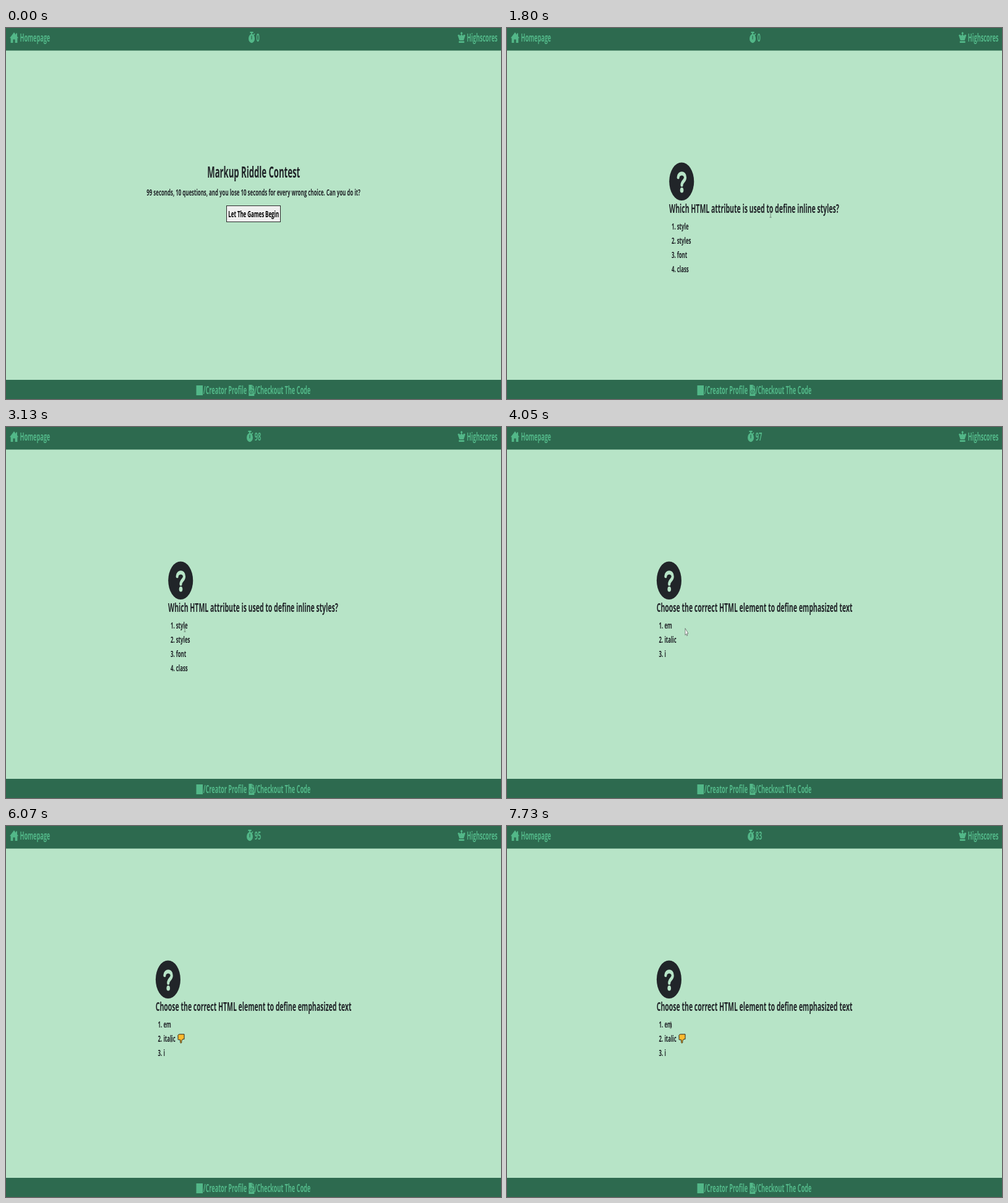
These frames come from a looping animation (800 by 600 pixels, 8 s). An HTML page with a canvas:

```html
<!DOCTYPE html>
<html lang="en">
<head>
<meta charset="utf-8">
<title>Quiz</title>
<style>
  html, body { margin: 0; width: 100%; height: 100%; overflow: hidden; background: #b7e4c7; }
  canvas { display: block; }
</style>
</head>
<body>
<canvas id="stage" width="800" height="600"></canvas>
<script>
const ctx = document.getElementById('stage').getContext('2d');
const LOOP = 8000;
const SQUEEZE = 0.525; // all lettering is equally condensed
const PALE = '#b7e4c7', DARK = '#2d6a4f', MINT = '#52b788', INK = '#212529';

const QUESTIONS = [
  { x: 262, title: 'Which HTML attribute is used to define inline styles?',
    answers: ['style', 'styles', 'font', 'class'] },
  { x: 241.7, title: 'Choose the correct HTML element to define emphasized text',
    answers: ['em', 'italic', 'i'] }
];

// [time, value]: the latest entry reached applies
const SCREEN = [[0, -1], [1730, 0], [4050, 1]];
const COUNTER = [[0, 0], [2730, 98], [3730, 97], [4720, 96], [5720, 95], [6740, 84], [7730, 83]];
const POINTER = [[0, 'none'], [120, 'arrow'], [1000, 'hand'], [1760, 'beam'],
                 [4050, 'arrow'], [5780, 'beam']];

// Pointer path: [time, x, y]
const PATH = [
  [120, 691, 556], [380, 570, 500], [540, 510, 462], [720, 458, 378], [840, 437, 330], [920, 426, 302],
  [2000, 426, 301], [2050, 427, 301], [2200, 425, 301], [2450, 407, 306], [2980, 291, 326],
  [3050, 290, 326], [3130, 289, 326], [3450, 289, 326], [3530, 288, 326], [5120, 288, 326],
  [5450, 279, 336], [5870, 268, 344], [6000, 267, 344], [6740, 267, 344],
  [7180, 264, 322], [7380, 264, 322], [7530, 264.5, 322]
];

const valueAt = (steps, t) => steps.filter(s => s[0] <= t).pop()[1];

function pointAt(t) {
  const next = PATH.findIndex(p => p[0] > t);
  if (next === 0) return PATH[0].slice(1);
  if (next < 0) return PATH[PATH.length - 1].slice(1);
  const a = PATH[next - 1], b = PATH[next];
  const k = (t - a[0]) / (b[0] - a[0]);
  return [a[1] + (b[1] - a[1]) * k, a[2] + (b[2] - a[2]) * k];
}

function label(text, x, y, size, color, align = 'left') {
  ctx.save();
  ctx.translate(x, y);
  ctx.scale(SQUEEZE, 1);
  ctx.font = `bold ${size}px "Open Sans", "Noto Sans", sans-serif`;
  ctx.textAlign = align;
  ctx.fillStyle = color;
  ctx.fillText(text, 0, 0);
  ctx.restore();
}

function box(x, y, w, h, color) {
  ctx.fillStyle = color;
  ctx.fillRect(x, y, w, h);
}

function oval(x, y, rx, ry, color) {
  ctx.fillStyle = color;
  ctx.beginPath();
  ctx.ellipse(x, y, rx, ry, 0, 0, 2 * Math.PI);
  ctx.fill();
}

function shape(d, x, y, fill, stroke, width = 1) {
  const path = new Path2D(d);
  ctx.save();
  ctx.translate(x, y);
  ctx.lineCap = ctx.lineJoin = 'round';
  if (fill) { ctx.fillStyle = fill; ctx.fill(path); }
  if (stroke) { ctx.strokeStyle = stroke; ctx.lineWidth = width; ctx.stroke(path); }
  ctx.restore();
}

function stopwatch(x) {
  oval(x, 17, 5, 7.2, MINT);
  box(x - 2.6, 6, 5.2, 2.2, MINT);
  box(x - 0.9, 6, 1.8, 5, MINT);
  shape('M3 11.5 L4.4 9.7', x, 0, null, MINT, 1.6);
  box(x - 0.6, 12.5, 1.2, 6, DARK);
}

function bars(count) {
  box(0, 0, 800, 36.5, DARK);
  box(0, 569, 800, 31, DARK);

  shape('M0 9.3 L7 0 L10 4 V1.5 H12 V6.6 L14 9.3 H12.4 V17 H8.6 V11.5 H5.4 V17 H1.6 V9.3 Z', 6, 7, MINT);
  label('Homepage', 22.4, 22, 17.4, MINT);

  const wide = count > 9;
  stopwatch(wide ? 394 : 397);
  label(count, wide ? 401.7 : 404.6, 22, 17.4, MINT);

  oval(736.2, 8.6, 1.5, 2, MINT);
  shape('M0 4.5 L2.2 3.6 L4 5.6 L6.2 3 L8.4 5.6 L10.2 3.6 L12.4 4.5 L9.7 13 H2.7 Z', 730, 7, MINT);
  box(731.8, 21.2, 8.8, 2.8, MINT);
  label('Highscores', 744.7, 22, 17.4, MINT);

  box(307.5, 578, 10.5, 16, MINT);
  label('/Creator Profile', 318.7, 592, 17.4, MINT);
  shape('M0 0 H5.3 V5.5 H9 V18 H0 Z M6 0 L9 4.6 H6 Z', 392.3, 577, MINT);
  shape('M3 8.5 L1.5 11.5 L3 14.5 M6 8.5 L7.5 11.5 L6 14.5 M5 8 L4 15', 392.3, 577, null, DARK, 0.8);
  label('/Checkout The Code', 401.4, 592, 17.4, MINT);
}

function intro() {
  label('Markup Riddle Contest', 400.3, 242.3, 25, INK, 'center');
  label('99 seconds, 10 questions, and you lose 10 seconds for every wrong choice. Can you do it?',
    400, 270.6, 15, INK, 'center');
  box(356.5, 287.5, 87.5, 26, '#efefef');
  ctx.strokeStyle = '#2b2b2b';
  ctx.lineWidth = 1;
  ctx.strokeRect(356.5, 287.5, 87, 26);
  label('Let The Games Begin', 400.2, 305.8, 15, '#000', 'center');
}

function question({ x, title, answers }) {
  ctx.save();
  ctx.translate(x + 20.2, 248.2);
  ctx.scale(0.65, 1);
  oval(0, 0, 30.8, 30.8, INK);
  shape('M-8.5 -7 C-8 -14.5 9 -15 9 -6.5 C9 -0.5 0.5 -0.5 0.5 5.5', 0, 0, null, PALE, 6.3);
  oval(0.5, 14, 4.3, 4.3, PALE);
  ctx.restore();
  label(title, x, 299, 20, INK);
  answers.forEach((answer, i) => label(`${i + 1}. ${answer}`, x + 3.9, 326 + 23.1 * i, 15, INK));
}

function thumbDown() {
  shape('M0.5 2 Q1 0.5 3 0.5 H10.5 V8.5 H8 L6.3 11 V14 Q5.3 16 4.2 14 V9.5 H1 Q0 9 0.5 7.5 Z',
    277.5, 336.3, '#fdb92e', '#2b2417', 1);
}

function pointer(kind, x, y) {
  if (kind === 'arrow') {
    shape('M0 0 V10.5 L1.6 8.6 L2.8 11.8 L3.9 11 L2.8 8 H4.6 Z', x, y, '#fff', '#555', 0.7);
  } else if (kind === 'hand') {
    shape('M0 0.8 Q0.8 -0.6 1.6 0.8 V5 L5.2 6 Q6 6.5 5.8 8.5 L5 12.5 H0.6 L-2.2 8.2 Q-2 6.8 -0.8 7.6 L0 8.4 Z',
      x, y, '#fff', '#333', 0.7);
  } else if (kind === 'beam') {
    shape('M-1.3 -5 H1.3 M0 -5 V5 M-1.3 5 H1.3', x, y, null, '#5d6b63', 0.7);
  }
}

function draw(now) {
  const t = now % LOOP;
  box(0, 0, 800, 600, PALE);
  bars(valueAt(COUNTER, t));
  const screen = valueAt(SCREEN, t);
  if (screen < 0) intro();
  else question(QUESTIONS[screen]);
  if (t >= 6000) thumbDown();
  pointer(valueAt(POINTER, t), ...pointAt(t));
}

const start = performance.now();
function tick() {
  draw(performance.now() - start);
  requestAnimationFrame(tick);
}
tick();
</script>
</body>
</html>
```
